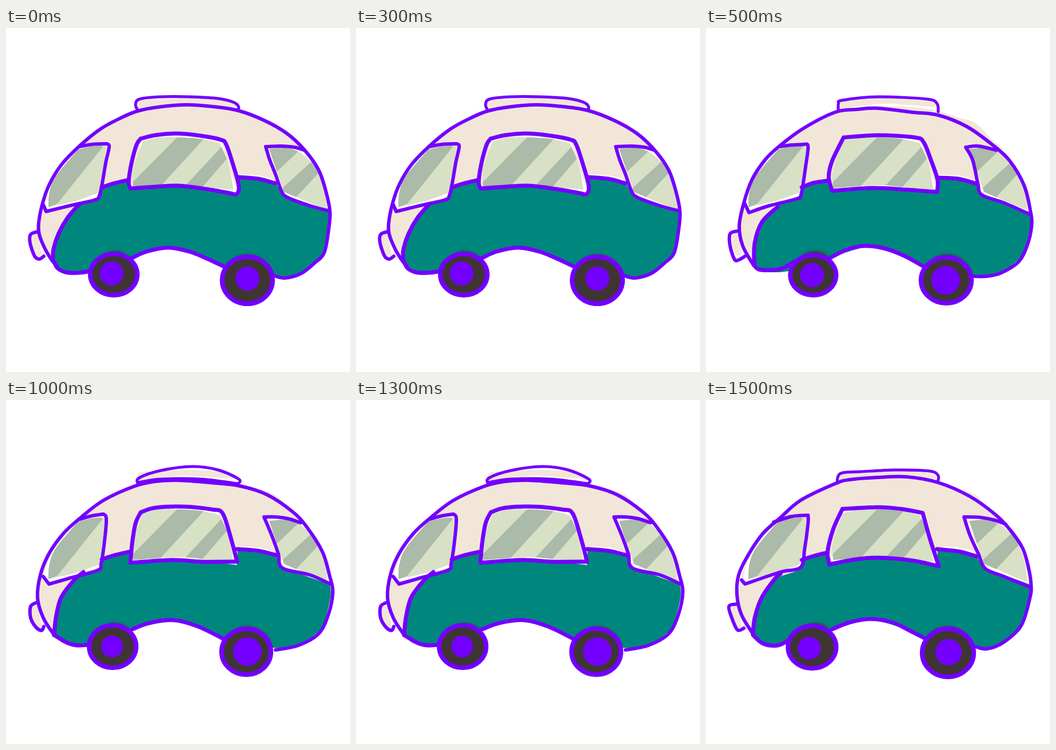
These frames come from a looping animation (600x600 px, 2 s). An HTML page with a canvas:

```html
<!DOCTYPE html>
<html lang="en">
<head>
<meta charset="utf-8">
<title>Wobbly camper van</title>
<style>
html, body { margin: 0; width: 100%; height: 100%; overflow: hidden; background: #fff; }
canvas { display: block; width: 100vw; height: 100vh; }
</style>
</head>
<body>
<canvas id="stage" width="600" height="600"></canvas>
<script>
const ctx = document.getElementById("stage").getContext("2d");
const INK = "#7300ff", CREAM = "#f2e6d8", TEAL = "#00877d";
const GLASS = "#d8e0c5", SHADE = "#abbaa9", TYRE = "#3f3533";
const HOLD = 500;

// Smooth curve through "x y" pairs; "|" marks a sharp corner at the point before it.
function curve(text) {
  const path = new Path2D();
  let last = null;
  for (const part of text.split("|")) {
    const n = part.trim().split(/\s+/).map(Number);
    const pts = last ? [last] : [];
    for (let i = 0; i < n.length; i += 2) pts.push([n[i], n[i + 1]]);
    if (!last) path.moveTo(...pts[0]);
    for (let i = 0; i < pts.length - 1; i++) {
      const b = pts[i], c = pts[i + 1];
      const a = pts[i - 1] || b, d = pts[i + 2] || c;
      path.bezierCurveTo(
        b[0] + (c[0] - a[0]) / 6, b[1] + (c[1] - a[1]) / 6,
        c[0] - (d[0] - b[0]) / 6, c[1] - (d[1] - b[1]) / 6, c[0], c[1]);
    }
    last = pts[pts.length - 1];
  }
  return path;
}

// Flat paint that stays still underneath the redrawn ink.
const paint = {
  shell: curve("82 408 64 378 57 342 63 304 77 268 101 233 130 205 168 175 226 147 300 137 360 138 405 145 440 156 470 166 496 192 520 214 547 252 560 290 565 322 | 480 330 | 300 330 | 120 320 | 82 408"),
  rack: curve("230 142 | 229 133 236 126 275 124 320 122 372 125 396 131 404 138 | 360 135 310 132 270 136 230 142"),
  bumper: curve("55 358 46 362 46 378 53 396 63 397 | 55 358"),
  side: curve("84 410 88 374 103 335 128 308 | 160 298 | 170 277 190 270 213 264 | 218 281 | 260 278 300 277 350 281 403 288 | 404 262 | 440 262 470 270 | 484 293 | 524 306 565 322 | 566 345 553 393 538 410 516 427 490 434 | 465 432 | 420 430 | 378 415 | 340 397 285 383 245 391 218 403 | 190 420 | 145 424 | 125 426 100 424 84 410")
};

const panes = [
  { hole: curve("128 207 | 176 203 | 165 292 | 72 319 | 66 305 78 270 100 237 128 207"),
    glass: curve("126 212 | 152 206 175 205 | 171 250 163 287 | 120 302 74 312 | 76 285 88 257 126 212"),
    bands: [[40, 330, 90, 306, 169, 207, 120, 180]] },
  { hole: curve("237 192 | 300 186 375 196 | 403 286 | 300 277 217 282 | 237 192"),
    glass: curve("238 198 | 265 191 308 191 345 194 373 201 | 388 237 397 282 | 350 278 300 274 222 279 | 221 250 238 198"),
    bands: [[212, 278, 303, 186, 352, 186, 262, 284], [308, 280, 379, 204, 392, 220, 337, 284]] },
  { hole: curve("453 206 | 490 207 520 213 | 548 252 564 321 | 483 293 | 468 247 453 206"),
    glass: curve("459 211 | 490 209 513 217 | 537 239 554 275 561 318 | 525 303 485 286 | 474 255 459 211"),
    bands: [[450, 200, 500, 202, 511, 214, 470, 253], [478, 283, 533, 233, 549, 249, 505, 296]] }
];

// Each pose is one hand-inked pass; wheels are [x, y, rx, ry, hubX, hubY, hubR].
const poses = [
  { body: "88 414 80 405 68 385 58 360 57 340 64 305 76 272 97 238 128 206 165 176 200 157 229 145 265 138 315 134 360 137 405 144 450 161 490 184 520 212 545 247 558 285 565 320 563 350 555 392 538 410 515 428 487 436 468 432",
    rack: "230 144 226 134 233 124 270 120 320 120 370 123 398 130 406 138 403 144",
    bumper: "56 355 43 360 42 375 50 398 58 403 66 398",
    left: "128 207 150 203 176 202 | 180 207 174 235 168 270 163 292 155 300 115 309 70 320 | 65 308",
    mid: "235 193 260 187 297 184 340 188 375 195 384 203 395 235 406 275 402 290 390 288 350 281 300 275 260 277 217 280 | 214 268 219 235 228 203 235 193",
    right: "520 213 503 208 480 206 453 207 | 460 230 470 255 480 283 490 295 530 310 563 319",
    seams: ["82 404 83 385 92 358 108 330 128 307", "167 278 188 271 214 265", "403 260 440 263 470 271"],
    under: ["84 408 90 419 104 426 125 427 148 424", "218 402 245 390 283 383 320 390 350 402 378 415"],
    wheels: [[188, 430, 41, 36, 184, 428, 21], [421, 440, 44, 41, 421, 437, 21]] },
  { body: "83 414 64 380 58 345 66 305 80 265 103 230 128 206 170 175 225 147 262 142 300 140 360 147 405 152 455 172 500 204 530 232 555 275 566 320 568 345 560 380 545 408 515 427 490 433 468 433",
    rack: "231 145 231 132 238 126 300 120 385 124 403 132 405 146",
    bumper: "56 354 42 359 42 380 50 404 58 404 68 398",
    left: "128 207 150 204 170 203 | 178 206 174 240 166 290 158 298 110 310 75 322 | 67 305",
    mid: "240 191 | 300 187 365 191 380 200 393 232 404 265 403 286 | 350 282 290 279 220 284 | 214 260 220 232 240 191",
    right: "506 213 475 206 453 208 | 465 230 474 270 481 291 520 305 567 326",
    seams: ["84 412 85 375 98 338 125 312", "167 278 188 270 214 266", "403 261 440 263 473 272"],
    under: ["83 412 92 421 120 422 136 418 155 407", "218 400 245 387 275 380 310 384 345 397 378 415"],
    wheels: [[187, 431, 40, 35, 185, 431, 21], [419, 440, 44, 40, 418, 440, 25]] },
  { body: "84 410 65 380 55 345 60 305 75 268 100 233 128 207 170 175 225 150 260 142 300 140 355 144 408 150 455 165 500 195 525 222 552 265 564 305 570 335 562 375 545 408 510 428 470 436",
    rack: "230 146 232 136 270 123 325 116 370 122 406 138 405 146 | 340 138 270 138 230 144",
    bumper: "54 353 43 360 43 380 52 396 62 402 66 395",
    left: "128 208 150 202 170 199 | 175 207 172 245 166 285 160 297 110 311 75 321 | 65 308",
    mid: "235 196 | 260 188 310 186 360 191 378 198 392 240 403 282 | 340 282 290 279 217 284 | 220 250 226 215 235 196",
    right: "514 214 492 207 470 204 450 204 | 463 235 475 268 482 293 530 305 566 321",
    seams: ["84 410 87 380 96 345 118 315 135 300", "167 278 188 271 214 265", "403 260 440 263 473 271"],
    under: ["84 410 108 424 125 428 145 427", "220 400 250 389 293 384 335 395 378 416"],
    wheels: [[186, 430, 41, 37, 185, 430, 19], [419, 439, 43, 40, 421, 439, 25]] },
  { body: "82 408 62 375 54 340 57 305 75 268 100 232 130 205 165 175 225 146 250 139 300 135 350 134 405 144 460 168 505 200 530 226 552 258 562 290 567 322 565 345 550 393 520 422 490 434 470 430",
    rack: "229 145 230 134 238 127 270 125 330 122 390 124 405 132 404 143",
    bumper: "53 356 40 360 45 380 55 401 66 398",
    left: "118 213 150 203 178 201 | 178 215 172 260 165 292 130 300 68 321 | 62 314",
    mid: "238 190 | 300 187 340 190 378 197 | 390 240 406 290 | 360 280 300 275 260 278 215 287 | 212 265 222 225 238 190",
    right: "523 217 505 210 480 205 450 204 | 460 235 475 268 487 294 520 308 567 327",
    seams: ["82 408 85 380 97 345 120 312 130 303", "167 279 188 272 212 266", "403 260 440 264 473 273"],
    under: ["82 410 100 425 125 428 145 418 158 407", "220 400 250 388 287 382 325 388 355 402 380 415"],
    wheels: [[185, 431, 42, 37, 180, 433, 20], [422, 441, 45, 42, 423, 440, 23]] }
].map(pose => ({
  wheels: pose.wheels,
  ink: [
    [5, pose.rack], [6, pose.bumper], [6, pose.body],
    [6, pose.left], [7, pose.mid], [6, pose.right],
    ...[...pose.seams, ...pose.under].map(s => [7, s])
  ].map(([width, text]) => [width, curve(text)])
}));

function fill(path, color) {
  ctx.fillStyle = color;
  ctx.fill(path);
}

function oval(x, y, rx, ry) {
  const path = new Path2D();
  path.ellipse(x, y, rx, ry, 0, 0, Math.PI * 2);
  return path;
}

function drawPane({ hole, glass, bands }) {
  fill(hole, "#fff");
  fill(glass, GLASS);
  ctx.save();
  ctx.clip(glass);
  for (const b of bands) {
    const band = new Path2D();
    for (let i = 0; i < b.length; i += 2) band.lineTo(b[i], b[i + 1]);
    fill(band, SHADE);
  }
  ctx.restore();
}

function drawPaint() {
  fill(paint.shell, CREAM);
  fill(paint.rack, CREAM);
  fill(paint.bumper, CREAM);
  fill(paint.side, TEAL);
  panes.forEach(drawPane);
  ctx.strokeStyle = "#fff";
  ctx.lineWidth = 4;
  ctx.stroke(curve("410 258 440 259 466 266"));
  ctx.filter = "blur(2px)";
  fill(oval(190, 428, 36, 39), TYRE);
  fill(oval(421, 438, 43, 43), TYRE);
  ctx.filter = "none";
}

function draw({ ink, wheels }) {
  ctx.fillStyle = "#fff";
  ctx.fillRect(0, 0, 600, 600);
  drawPaint();
  ctx.strokeStyle = INK;
  ctx.lineCap = ctx.lineJoin = "round";
  for (const [width, path] of ink) {
    ctx.lineWidth = width;
    ctx.stroke(path);
  }
  for (const [x, y, rx, ry, hubX, hubY, hubR] of wheels) {
    const rim = oval(x, y, rx, ry);
    // The rim hides body ink that runs behind the tyre.
    fill(rim, TYRE);
    ctx.lineWidth = 8;
    ctx.stroke(rim);
    fill(oval(hubX, hubY, hubR, hubR), INK);
  }
}

function tick(now) {
  draw(poses[Math.floor(now / HOLD) % poses.length]);
  requestAnimationFrame(tick);
}
tick(performance.now());
</script>
</body>
</html>
```
